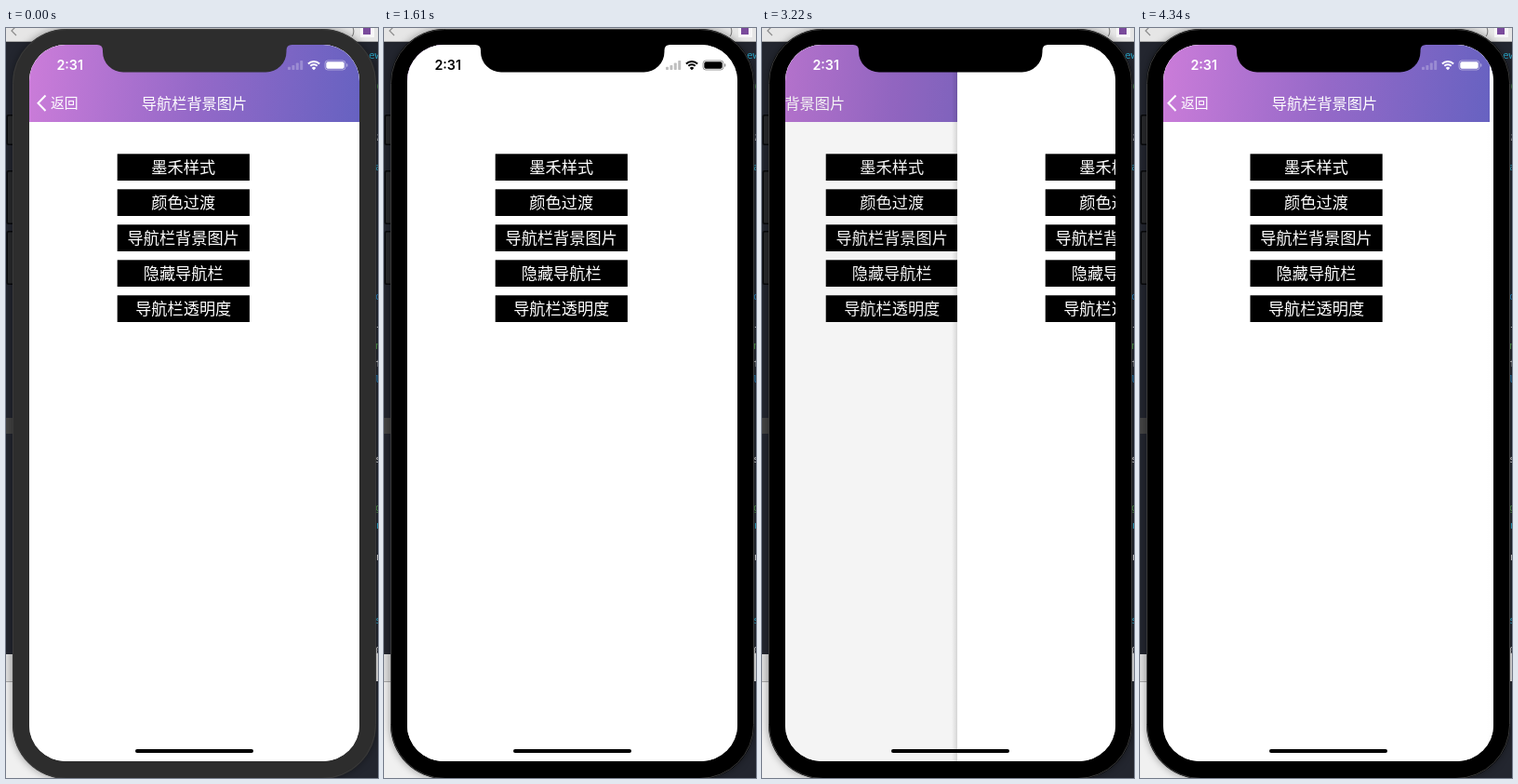
An HTML page with a canvas for the animation above (4.41 s loop, 400 by 806 pixels).

```html
<!DOCTYPE html>
<html lang="zh">
<head>
<meta charset="utf-8">
<title>Navigation bar transition</title>
<style>
  html, body { margin: 0; width: 100%; height: 100%; overflow: hidden; background: #23262f; }
  canvas { display: block; width: 400px; height: 806px; }
</style>
</head>
<body>
<canvas id="stage"></canvas>
<script>
const W = 400, H = 806, LOOP = 4410, STEP = 70;
const LEFT = 25, TOP = 18, SW = 355, SH = 770, BAR = 83;
const PUSH = 560, DRAG = 2100, ACTIVE = 70;
const CJK = '"Noto Sans CJK SC", "Noto Sans CJK", sans-serif';
const LABELS = ['墨禾样式', '颜色过渡', '导航栏背景图片', '隐藏导航栏', '导航栏透明度'];

const canvas = document.getElementById('stage');
const ctx = canvas.getContext('2d');
const dpr = window.devicePixelRatio || 1;
canvas.width = W * dpr;
canvas.height = H * dpr;

// Finger drag: time, page offset
const drag = [
  [2030, 0], [2100, 3], [2240, 35], [2520, 112], [2800, 197], [2980, 228], [3220, 185],
  [3500, 90], [3710, 42], [3850, 32], [3930, 62], [4060, 180], [4200, 304], [4340, 351], [4410, 355]
];

function slope(i) {
  if (i < 1 || i > drag.length - 2) return 0;
  const rate = k => (drag[k + 1][1] - drag[k][1]) / (drag[k + 1][0] - drag[k][0]);
  const a = rate(i - 1), b = rate(i);
  return a * b <= 0 ? 0 : 2 * a * b / (a + b);
}

function dragOffset(t) {
  let i = 0;
  while (i < drag.length - 2 && t >= drag[i + 1][0]) i++;
  const [t0, a] = drag[i], [t1, b] = drag[i + 1];
  const d = t1 - t0, u = (t - t0) / d, v = 1 - u;
  return a * (1 + 2 * u) * v * v + slope(i) * d * u * v * v
    + b * u * u * (3 - 2 * u) - slope(i + 1) * d * u * u * v;
}

// Distance of the pushed page from the left screen edge
function pageOffset(t) {
  if (t < PUSH) return SW;
  if (t >= DRAG) return dragOffset(t);
  if (t > 1330) return 0;
  const x = (t - PUSH) * 0.0114;
  return SW * (1 + x) * Math.exp(-x);
}

function rect(x, y, w, h, color) {
  ctx.fillStyle = color;
  ctx.fillRect(x, y, w, h);
}

function round(x, y, w, h, r, color) {
  ctx.beginPath();
  ctx.roundRect(x, y, w, h, r);
  ctx.fillStyle = color;
  ctx.fill();
}

function text(str, x, y, font, color, align = 'center') {
  ctx.font = font;
  ctx.textAlign = align;
  ctx.fillStyle = color;
  ctx.fillText(str, x, y);
}

function polyline(points, color, width) {
  ctx.beginPath();
  points.forEach(([x, y]) => ctx.lineTo(x, y));
  ctx.strokeStyle = color;
  ctx.lineWidth = width;
  ctx.stroke();
}

function drawDesktop() {
  rect(0, 0, W, H, '#23262f');
  rect(0, 0, W, 15, '#e6e6e6');
  rect(0, 14, W, 1, '#a9a9a9');
  polyline([[11, -2], [6, 3], [11, 8]], '#8b8b8b', 1.2);
  text(')', 373, 7, '12px "Open Sans", sans-serif', '#777');
  rect(381, 0, 15, 10, '#f7f7f7');
  rect(384, 0, 8, 7, '#7a4b9c');
  rect(0, 419, 10, 17, '#434343');
  rect(0, 673, 60, 133, '#f0f0f0');
  rect(0, 673, 60, 29, '#dedede');
  rect(0, 702, 60, 1, '#a8a8a8');
  rect(394, 672, 6, 30, '#e8e8e8');

  const code = [
    ['ew', 390, 33, '#2aa7c9'], ['(', 397, 66, '#4f9a4a'], [';', 397, 120, '#ddd'],
    ['a', 397, 153, '#2aa7c9'], ['o', 397, 292, '#2489c9'], ['-', 397, 324, '#ddd'],
    ['n', 397, 345, '#4f9a4a'], ['f', 397, 364, '#ddd'], ['l', 396, 381, '#2489c9'],
    ['s', 397, 467, '#ddd'], ['g', 397, 519, '#4f9a4a'], ['r', 397, 538, '#2aa7c9'],
    ['r', 397, 572, '#ddd'], ['s', 397, 640, '#2aa7c9'], ['0', 397, 673, '#ddd']
  ];
  for (const [s, x, y, color] of code) text(s, x, y, '11px "DejaVu Sans Mono", monospace', color, 'left');
}

function drawBody(color) {
  for (const [y, h] of [[93, 33], [153, 58], [218, 58]]) {
    round(0.5, y, 9, h, 2, '#08090b');
    round(2, y + 1.5, 7, h - 3, 1, '#292a2c');
  }
  ctx.save();
  ctx.shadowColor = 'rgba(0,0,0,.4)';
  ctx.shadowBlur = 8 * dpr;
  round(7, 1, 391, 806, 58, color);
  ctx.restore();
  ctx.beginPath();
  ctx.roundRect(7.5, 1.5, 390, 805, 58);
  ctx.strokeStyle = '#3a3a3a';
  ctx.lineWidth = 1;
  ctx.stroke();
}

function drawPage(x) {
  rect(x, TOP, SW, SH, '#fff');
  LABELS.forEach((label, i) => {
    const y = 135.3 + i * 38;
    rect(x + 94.7, y, 142.2, 28.7, '#000');
    text(label, x + 165.7, y + 20.8, '17.2px ' + CJK, '#fff');
  });
}

function drawBar(x, shift) {
  const fill = ctx.createLinearGradient(x, TOP + 20, x + SW, TOP + 62);
  fill.addColorStop(0, '#cb7cd9');
  fill.addColorStop(0.5, '#9569c8');
  fill.addColorStop(1, '#6762c1');
  rect(x, TOP, SW, BAR, fill);
  polyline([[42.5 + shift, 72.5], [34.5 + shift, 80.8], [42.5 + shift, 89]], '#fff', 2);
  text('返回', 48 + shift, 86.4, '14.8px ' + CJK, '#fff', 'left');
  text('导航栏背景图片', 202.5 + shift, 87, '500 16.2px ' + CJK, '#fff');
}

function drawShadow(x, strength) {
  const g = ctx.createLinearGradient(x - 6, 0, x, 0);
  g.addColorStop(0, 'rgba(0,0,0,0)');
  g.addColorStop(1, `rgba(0,0,0,${strength})`);
  rect(x - 6, TOP, 6, SH, g);
}

function drawStatus(timeColor, iconColor) {
  text('2:31', 68.7, 45, '600 14.3px Inter, sans-serif', timeColor);

  ctx.globalAlpha = 0.25;
  [3.2, 5, 7.4, 10].forEach((h, i) => round(303 + i * 4.4, 45 - h, 3, h, 0.7, iconColor));
  ctx.globalAlpha = 1;

  ctx.strokeStyle = iconColor;
  ctx.lineWidth = 2;
  for (const r of [5.2, 8.6]) {
    ctx.beginPath();
    ctx.arc(331, 44.5, r, -Math.PI * 0.75, -Math.PI * 0.25);
    ctx.stroke();
  }
  ctx.beginPath();
  ctx.moveTo(331, 45.2);
  ctx.arc(331, 45.2, 3.2, -Math.PI * 0.75, -Math.PI * 0.25);
  ctx.fillStyle = iconColor;
  ctx.fill();

  ctx.globalAlpha = 0.4;
  ctx.beginPath();
  ctx.roundRect(343, 35, 22, 10, 3);
  ctx.lineWidth = 1;
  ctx.stroke();
  round(366, 38.2, 1.4, 3.6, 0.7, iconColor);
  ctx.globalAlpha = 1;
  round(344.3, 36.3, 19.4, 7.4, 1.8, iconColor);
}

function drawNotch(color) {
  ctx.beginPath();
  ctx.moveTo(98, 17);
  ctx.lineTo(98, 18);
  ctx.quadraticCurveTo(104, 18, 104, 24);
  ctx.arcTo(104, 47.5, 128, 47.5, 22);
  ctx.arcTo(301.5, 47.5, 301.5, 24, 22);
  ctx.lineTo(301.5, 24);
  ctx.quadraticCurveTo(301.5, 18, 307.5, 18);
  ctx.lineTo(307.5, 17);
  ctx.fillStyle = color;
  ctx.fill();
}

function draw(t) {
  const offset = pageOffset(t);
  const covered = 1 - offset / SW;
  const edge = LEFT + offset;
  const back = LEFT - 0.3 * (SW - offset);
  const body = t < ACTIVE ? '#2d2d2d' : '#000';

  ctx.setTransform(dpr, 0, 0, dpr, 0, 0);
  drawDesktop();
  drawBody(body);

  ctx.save();
  ctx.beginPath();
  ctx.roundRect(LEFT, TOP, SW, SH, 39);
  ctx.clip();
  rect(LEFT, TOP, SW, SH, '#fff');
  drawPage(back);
  drawBar(back, offset - SW);
  if (covered > 0) {
    rect(LEFT, TOP, offset, SH, `rgba(0,0,0,${0.09 * covered})`);
    if (offset > 0.5) drawShadow(edge, t < DRAG ? 0.03 : 0.13 * Math.min(1, covered * 2));
    drawPage(edge);
  }
  const dark = t >= PUSH + 140;
  drawStatus(dark && t < DRAG ? '#000' : '#fff', dark && t < 2310 ? '#000' : '#fff');
  ctx.restore();

  drawNotch(body);
  round(139, 775, 127, 4, 2, '#000');
}

const start = performance.now();
function tick() {
  const t = (performance.now() - start) % LOOP;
  draw(Math.floor(t / STEP) * STEP);
  requestAnimationFrame(tick);
}
tick();
</script>
</body>
</html>
```
